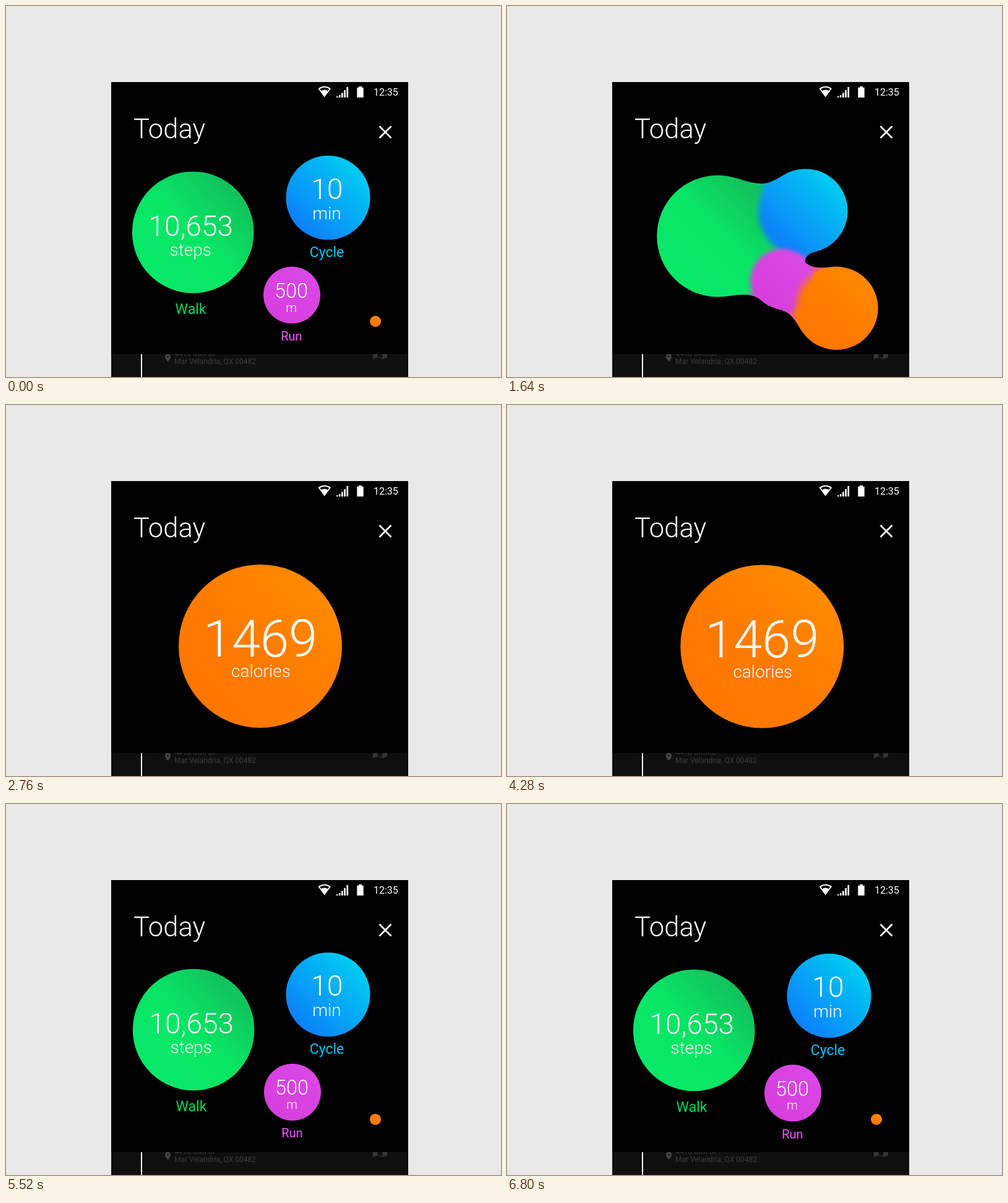
An HTML page with a canvas for the animation above (6.84 s loop, 800x600 px).

```html
<!DOCTYPE html>
<html lang="en">
<head>
<meta charset="utf-8">
<title>Activity bubbles</title>
<style>
  html, body { margin: 0; width: 100%; height: 100%; overflow: hidden; background: #e9e9e9; }
  #phone { position: absolute; left: 170px; top: 123px; width: 480px; height: 477px; background: #000; }
  canvas, svg { position: absolute; left: 0; top: 0; width: 800px; height: 600px; }
  text { font-family: Roboto, Arial, sans-serif; fill: #fff; }
  .light { font-weight: 300; }
  .mid { text-anchor: middle; }
</style>
</head>
<body>
<div id="phone"></div>
<canvas id="stage" width="800" height="600"></canvas>
<svg id="ui" viewBox="0 0 800 600">
  <defs><clipPath id="sheet"><rect x="170" y="563" width="480" height="37"/></clipPath></defs>
  <g fill="#fff">
    <path d="M504.500 133.500Q514.700 126 525 133.500L514.700 147.500Z"/>
    <path d="M507.300 134.200Q514.700 129.300 522.200 134.200L520 137.200Q514.700 133.800 509.500 137.200Z" fill="#000"/>
    <path d="M534 148v-2h2.500v2zM538 148v-4h2.500v4zM542 148v-7.500h2.700v7.500zM546.200 148v-12h2.700v12zM550.400 148v-17h2.700v17z"/>
    <path d="M567.300 132h2.700v-2h5v2h2.700v16h-10.400z"/>
  </g>
  <text x="594" y="145" font-size="16">12:35</text>
  <text class="light" x="206" y="214" font-size="43.500">Today</text>
  <path d="M603.500 194.500l19 19m0 -19l-19 19" stroke="#fff" stroke-width="2.700"/>
  <g clip-path="url(#sheet)">
    <rect x="170" y="563" width="480" height="37" fill="#0f0f0f"/>
    <rect x="218" y="563" width="2" height="37" fill="#fff"/>
    <path d="M261.500 575.500c-3-4-4.500-6-4.500-8.500a4.500 4.500 0 0 1 9 0c0 2.500-1.500 4.500-4.500 8.500z" fill="#484848"/>
    <circle cx="261.500" cy="567" r="1.600" fill="#0f0f0f"/>
    <g font-size="12">
      <text x="272" y="566" style="fill:#3d3d3d">4418 Olm St</text>
      <text x="272" y="579" style="fill:#3d3d3d">Mar Velandria, QX 00482</text>
    </g>
    <path d="M593 553l7-2.500 8 2.500 8-2.500v18l-8 2.500-8-2.500-7 2.500z" fill="#363636"/>
    <path d="M600.500 551v16.500l7.500 2.500v-16.500z" fill="#0f0f0f"/>
  </g>
</svg>
<script>
const LOOP = 6840, STEP = 40;
const ctx = document.getElementById('stage').getContext('2d');
const ui = document.getElementById('ui');

const clamp = v => Math.max(0, Math.min(1, v));
const mix = (a, b, p) => a + (b - a) * p;
const span = (t, a, b) => clamp((t - a) / (b - a));
const smooth = u => u * u * (3 - 2 * u);

function bezier(x1, y1, x2, y2) {
  const at = (a, b, s) => 3 * (1 - s) * (1 - s) * s * a + 3 * (1 - s) * s * s * b + s * s * s;
  return u => {
    let lo = 0, hi = 1;
    for (let i = 0; i < 24; i++) {
      const m = (lo + hi) / 2;
      if (at(x1, x2, m) < u) lo = m; else hi = m;
    }
    return at(y1, y2, (lo + hi) / 2);
  };
}
const travel = bezier(.4, 0, .2, 1);
const grow = bezier(.35, .2, .6, 1);

// rows: text, dx, dy, size, weight
const bubbles = [
  { x: 302.2, y: 366, fx: .9, fy: -1, r: 98.3, ends: ['#08e868', '#08e665', '#12c05a'], label: '#00d85a',
    rows: [['10,653', -3.4, 6, 46, 300], ['steps', -4, 38, 28, 300], ['Walk', -3.7, 132, 23, 400]] },
  { x: 520.5, y: 310, fx: 0, fy: -1.8, r: 68, ends: ['#0c80fa', '#06a6f6', '#00cdf0'], label: '#00c8f5',
    rows: [['10', -1.8, 2, 46.5, 300], ['min', -2, 35, 28, 300], ['Cycle', -2, 96, 23, 400]] },
  { x: 462, y: 467.5, fx: 1, fy: -1.6, r: 46, ends: ['#d63fde', '#d843e2', '#da48e6'], label: '#ee58fc',
    rows: [['500', -1, 4.5, 32.5, 300], ['m', -1, 27, 20, 300], ['Run', -.6, 73.5, 20, 400]] }
];
const sun = { ends: ['#ff7600', '#ff7c00', '#ff8a00'], label: '#fff',
  rows: [['1469', 0, 17, 83, 300], ['calories', 1, 50, 28, 300]] };
const DOT = { x: 597, y: 510, r: 9 }, BIG = { x: 411, y: 390, r: 132 };

function addLabels(ball) {
  ball.g = document.createElementNS(ui.namespaceURI, 'g');
  for (const [str, x, y, size, weight] of ball.rows) {
    const el = document.createElementNS(ui.namespaceURI, 'text');
    el.textContent = str;
    el.setAttribute('class', 'mid');
    el.setAttribute('x', x);
    el.setAttribute('y', y);
    el.style.fontSize = size + 'px';
    el.style.fontWeight = weight;
    if (weight === 400) el.style.fill = ball.label;
    ball.g.appendChild(el);
  }
  ui.appendChild(ball.g);
}
[...bubbles, sun].forEach(addLabels);

function placeLabels(ball, b, scale, alpha) {
  ball.g.setAttribute('transform', `translate(${b.x} ${b.y}) scale(${scale})`);
  ball.g.setAttribute('opacity', alpha);
}

function disc(b, r) {
  const k = b.r * .72;
  const fill = ctx.createLinearGradient(b.x - k, b.y + k, b.x + k, b.y - k);
  b.ends.forEach((c, i) => fill.addColorStop(i / 2, c));
  ctx.fillStyle = fill;
  ctx.beginPath();
  ctx.arc(b.x, b.y, r, 0, 7);
  ctx.fill();
}

// liquid neck between two discs; becomes their common hull when they overlap deeply
function neck(a, b) {
  const GAP = 25;
  const d = Math.hypot(b.x - a.x, b.y - a.y), sum = a.r + b.r;
  if (d >= sum + GAP || d <= Math.abs(a.r - b.r) + .01) return;
  let v, u1 = 0, u2 = 0;
  if (d < sum) {
    u1 = Math.acos((a.r * a.r + d * d - b.r * b.r) / (2 * a.r * d));
    u2 = Math.acos((b.r * b.r + d * d - a.r * a.r) / (2 * b.r * d));
    v = mix(.5, 1, clamp((sum - d) / (sum * .5)));
  } else {
    v = .5 * (1 - (d - sum) / GAP);
  }
  const dir = Math.atan2(b.y - a.y, b.x - a.x);
  const hull = Math.acos((a.r - b.r) / d);
  const s1 = mix(u1, hull, v), s2 = mix(Math.PI - u2, hull, v);
  const on = (c, ang) => ({ x: c.x + c.r * Math.cos(ang), y: c.y + c.r * Math.sin(ang) });
  const p1 = on(a, dir + s1), p2 = on(b, dir + s2), p3 = on(b, dir - s2), p4 = on(a, dir - s1);
  const pull = Math.min(v * 2.4, Math.hypot(p1.x - p2.x, p1.y - p2.y) / sum) * Math.min(1, 2 * d / sum);
  const off = (p, ang, len) => [p.x + len * Math.cos(ang), p.y + len * Math.sin(ang)];
  const q = Math.PI / 2, ra = a.r * pull, rb = b.r * pull;
  const fill = ctx.createLinearGradient(a.x, a.y, b.x, b.y);
  fill.addColorStop(.2, a.ends[1]);
  fill.addColorStop(.8, b.ends[1]);
  ctx.fillStyle = fill;
  ctx.beginPath();
  ctx.moveTo(p1.x, p1.y);
  ctx.bezierCurveTo(...off(p1, dir + s1 - q, ra), ...off(p2, dir + s2 + q, rb), p2.x, p2.y);
  ctx.lineTo(p3.x, p3.y);
  ctx.bezierCurveTo(...off(p3, dir - s2 - q, rb), ...off(p4, dir - s1 + q, ra), p4.x, p4.y);
  ctx.fill();
}

function soft(b, r, blur, alpha) {
  ctx.globalAlpha = alpha;
  ctx.filter = `blur(${blur}px)`;
  disc(b, r);
  ctx.filter = 'none';
  ctx.globalAlpha = 1;
}

function draw(t) {
  const joining = t < 3500;
  // f: how far the bubbles have gathered, g: how far the dot has grown
  const f = joining ? travel(span(t, 1330, 2390)) : 1 - smooth(span(t, 4510, 5530));
  const g = joining ? grow(span(t, 1245, 2205)) : Math.pow(f, .87);
  const hover = joining ? smooth(span(t, 0, 1240)) : 1 - smooth(span(t, 5530, LOOP));
  const drift = smooth(span(t, 3920, 4280));
  const small = joining ? 1 - span(t, 1350, 1600) : span(t, 5120, 5440);
  const large = joining ? span(t, 1700, 2060) : 1 - span(t, 4600, 4920);
  const cx = BIG.x + 1.3 * drift, cy = BIG.y + .5 * drift;

  const balls = bubbles.map(b => ({
    ends: b.ends, r: b.r,
    x: mix(b.x + b.fx * hover, cx, f),
    y: mix(b.y + b.fy * hover, cy, f - .8 * f * f * (1 - f))
  }));
  const main = {
    ends: sun.ends, r: mix(DOT.r, BIG.r, g),
    x: mix(DOT.x, cx, f),
    y: mix(DOT.y, cy, f - .75 * f * (1 - f))
  };
  const all = [...balls, main];

  ctx.clearRect(0, 0, 800, 600);
  all.forEach((a, i) => all.slice(i + 1).forEach(b => neck(a, b)));
  all.forEach(b => disc(b, b.r));

  // colours bleed into each other inside the merged outline
  if (f > 0 && f < 1) {
    ctx.globalCompositeOperation = 'source-atop';
    const fade = clamp((1 - f) / .1);
    balls.forEach(b => soft(b, b.r * 1.12, b.r * .07, fade));
    soft(main, main.r * .97, main.r * .09, 1);
    ctx.globalCompositeOperation = 'source-over';
  }

  const press = .11 * clamp(1 - Math.abs(t - 1240) / 90);
  if (press) {
    ctx.fillStyle = `rgba(255,255,255,${press})`;
    ctx.beginPath();
    ctx.arc(main.x, main.y, main.r, 0, 7);
    ctx.fill();
  }

  bubbles.forEach((b, i) => placeLabels(b, balls[i], 1, small));
  placeLabels(sun, main, main.r / BIG.r, large);
}

const start = performance.now();
function tick() {
  const t = (performance.now() - start) % LOOP;
  draw(Math.floor(t / STEP) * STEP);
  requestAnimationFrame(tick);
}
tick();
</script>
</body>
</html>
```
